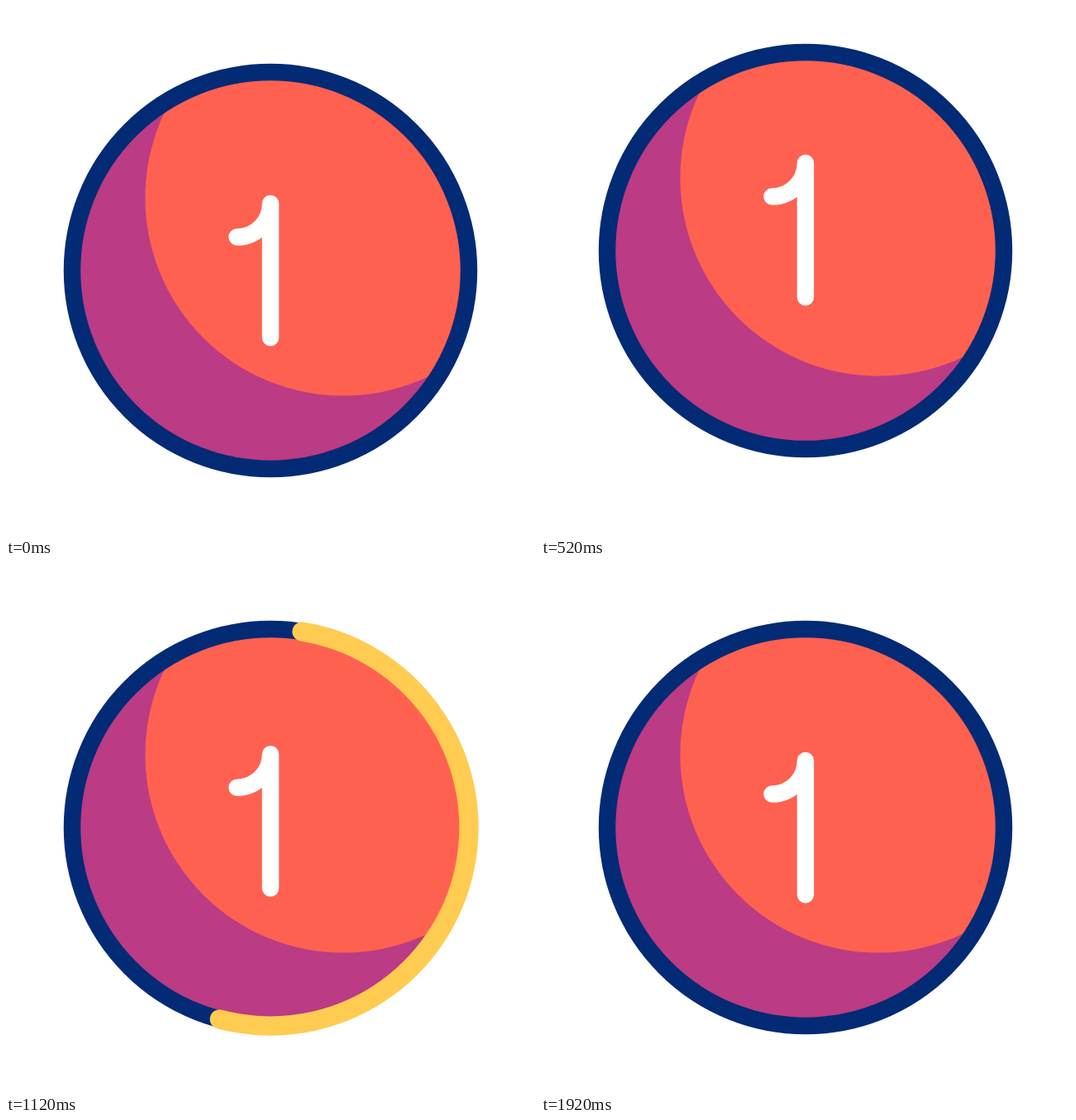
Recreate the animation shown at these times as an HTML page with a canvas. Size 640 px wide and 640 px high, loop 2000 ms.

```html
<!DOCTYPE html>
<html lang="en">
<head>
<meta charset="utf-8">
<title>Countdown ball</title>
<style>
  html, body { margin: 0; width: 100%; height: 100%; overflow: hidden; background: #fff; }
  canvas { display: block; width: 100vmin; height: 100vmin; }
</style>
</head>
<body>
<canvas id="stage" width="640" height="640"></canvas>
<script>
const ctx = document.getElementById('stage').getContext('2d');
const LOOP = 2000, STEP = 40;
const TAU = Math.PI * 2;
const C = 320, RING = 240, SCROLL = 466;
const NAVY = '#032a75', PURPLE = '#bb3b84', CORAL = '#ff6150', YELLOW = '#ffcb50';

// Keys are [time, value] pairs, eased in and out between neighbours.
const BALL = [[120, 0], [360, 33.3], [560, -30.6], [760, 0]];
const DIGIT = [[120, 0], [360, 21.7], [560, -30.4], [1165, SCROLL]];
const HEAD = [[760, 0], [1440, 1]];
const TAIL = [[1040, 0], [1840, 1]];

function valueAt(keys, t) {
  if (t <= keys[0][0]) return keys[0][1];
  for (let i = 1; i < keys.length; i++) {
    const [t0, a] = keys[i - 1], [t1, b] = keys[i];
    if (t < t1) {
      const u = (t - t0) / (t1 - t0);
      return a + (b - a) * u * u * (3 - 2 * u);
    }
  }
  return keys[keys.length - 1][1];
}

function disc(x, y, r, color) {
  ctx.beginPath();
  ctx.arc(x, y, r, 0, TAU);
  ctx.fillStyle = color;
  ctx.fill();
}

function ringArc(from, to, width, color) {
  ctx.beginPath();
  ctx.arc(C, C, RING, from, to);
  ctx.lineWidth = width;
  ctx.strokeStyle = color;
  ctx.stroke();
}

function drawOne(dy) {
  ctx.beginPath();
  ctx.moveTo(279.5, 279.5 + dy);
  ctx.arc(279.5, 239 + dy, 40.5, Math.PI / 2, 0, true);
  ctx.lineTo(C, 401.3 + dy);
  ctx.lineWidth = 20.5;
  ctx.strokeStyle = '#fff';
  ctx.stroke();
}

function draw(t) {
  ctx.fillStyle = '#fff';
  ctx.fillRect(0, 0, 640, 640);
  ctx.lineCap = ctx.lineJoin = 'round';

  ctx.save();
  ctx.translate(0, valueAt(BALL, t));

  ctx.save();
  ctx.beginPath();
  ctx.arc(C, C, RING, 0, TAU);
  ctx.clip();
  disc(C, C, RING + 2, PURPLE);
  disc(408, 232, 239.6, CORAL);
  const dy = valueAt(DIGIT, t);
  drawOne(dy);
  drawOne(dy - SCROLL);
  ctx.restore();

  ringArc(0, TAU, 20.5, NAVY);
  ctx.restore();

  const head = valueAt(HEAD, t), tail = valueAt(TAIL, t);
  if (head > tail) {
    const top = -Math.PI / 2 - 0.017;
    ringArc(top + tail * TAU, top + head * TAU, 23.3, YELLOW);
  }
}

const start = performance.now();
function tick() {
  const t = (performance.now() - start) % LOOP;
  draw(Math.floor(t / STEP) * STEP);
  requestAnimationFrame(tick);
}
tick();
</script>
</body>
</html>
```
